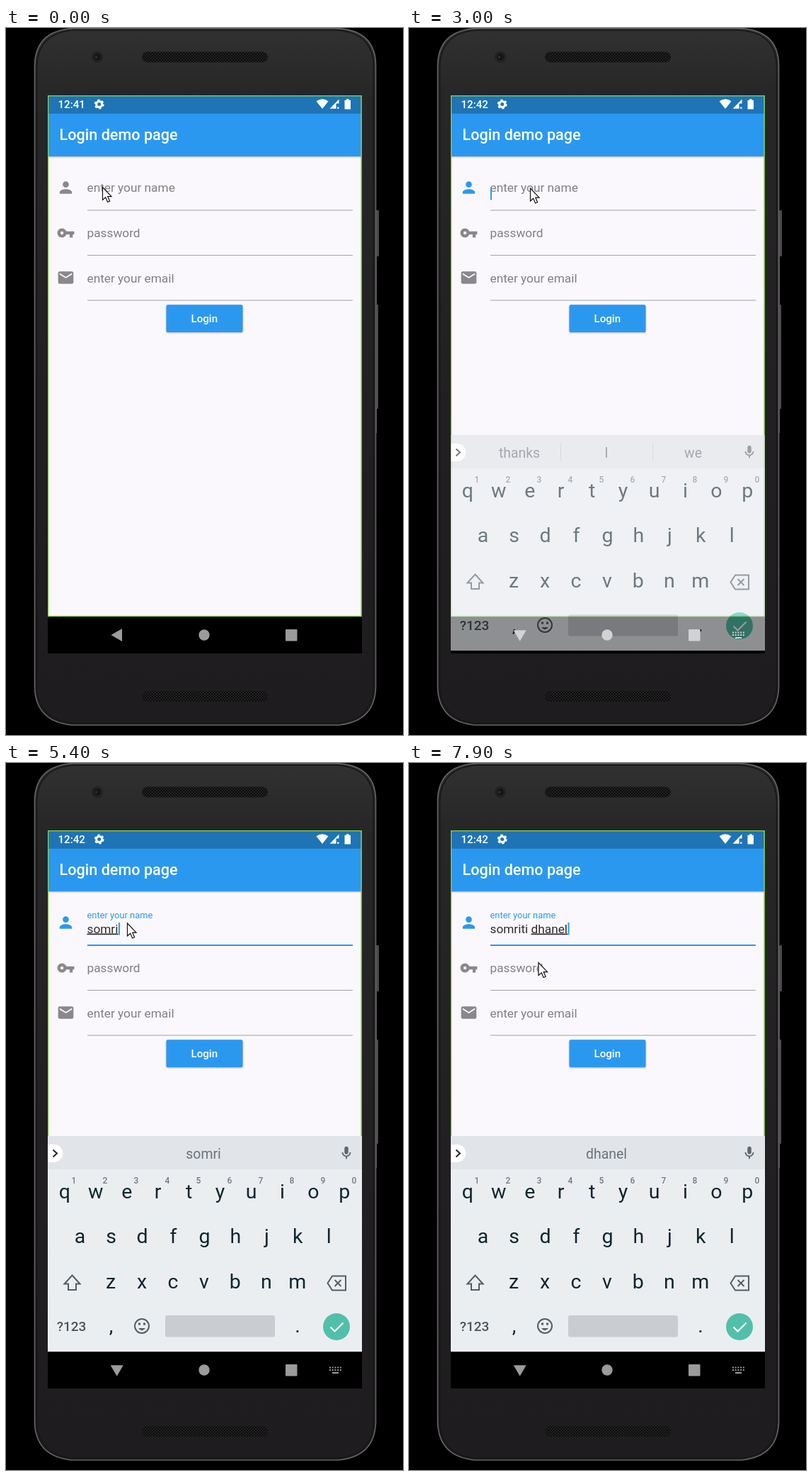
Write an HTML page that moves like this. It is 561 px wide and 997 px high and loops after 8000 ms.

```html
<!DOCTYPE html>
<html lang="en">
<head>
<meta charset="utf-8">
<title>Login demo</title>
<style>
html, body { margin: 0; width: 100%; height: 100%; overflow: hidden; background: #000; }
svg { display: block; width: 100%; height: 100%; font-family: Roboto, sans-serif; }
text { white-space: pre; }
.med { font-weight: 500; }
.mid { text-anchor: middle; }
.field { font-size: 17.25px; fill: #807f82; }
.key { font-size: 28.5px; fill: #0e2630; text-anchor: middle; }
.num { font-size: 12px; font-weight: 500; fill: #737b80; text-anchor: middle; }
.sug { font-size: 19.4px; fill: #6c7378; text-anchor: middle; }
.line { fill: none; stroke: #535d63; stroke-width: 2; }
.raised { filter: drop-shadow(0 1.5px 1.3px rgba(0, 0, 0, .3)); }
</style>
</head>
<body>
<svg viewBox="0 0 561 997">
  <defs>
    <linearGradient id="body" x1="0" y1="0" x2="0" y2="1">
      <stop offset="0" stop-color="#323132"/><stop offset=".09" stop-color="#282728"/>
      <stop offset=".5" stop-color="#222022"/><stop offset="1" stop-color="#1e1c1e"/>
    </linearGradient>
    <pattern id="mesh" width="4" height="4" patternUnits="userSpaceOnUse">
      <rect width="4" height="4" fill="#232223"/>
      <circle cx="1" cy="1" r="1.1" fill="#080808"/><circle cx="3" cy="3" r="1.1" fill="#080808"/>
    </pattern>
    <clipPath id="screen"><rect x="59" y="95" width="444" height="787"/></clipPath>
  </defs>

  <rect width="561" height="997"/>
  <g fill="#4b4a4b">
    <rect x="522" y="257" width="5" height="65" rx="1"/>
    <rect x="522" y="390" width="4" height="147" rx="1"/>
    <rect x="521" y="280" width="3" height="291"/>
  </g>
  <path d="M96 .5H467Q522 3 522.5 52V930Q521 978 470 983H93Q42 978 40.5 930V52Q42 3 96 .5Z" fill="url(#body)" stroke="#666566" stroke-width="1.6"/>
  <path d="M97 3H466Q519 6 519.5 54V929Q518 975 469 980.5H94Q45 975 43.5 929V54Q45 6 97 3Z" fill="none" stroke="#171617" stroke-width="1.6"/>
  <g fill="url(#mesh)">
    <rect x="192" y="33.5" width="178" height="15" rx="7.5"/>
    <rect x="192" y="935" width="178" height="15" rx="7.5"/>
  </g>
  <circle cx="129" cy="41" r="8" fill="#232223"/>
  <circle cx="129" cy="41" r="5" fill="#171617"/>
  <circle cx="127.5" cy="41" r="1.5" fill="#383739"/>

  <g clip-path="url(#screen)">
    <rect x="59" y="95" width="444" height="787"/>
    <rect x="59" y="95" width="443.5" height="735" fill="#faf8fc"/>
    <rect x="59" y="120" width="443.5" height="61" fill="#2b98f0" class="raised"/>
    <rect x="59" y="95" width="443.5" height="25.8" fill="#1e74b4"/>
    <rect x="59.6" y="95.6" width="442.4" height="733.9" fill="none" stroke="#86d04c" stroke-width="1.4"/>
    <g fill="#fff">
      <text id="clock" class="med" x="73.5" y="113" font-size="15.1"></text>
      <g fill="none" stroke="#fff">
        <circle cx="131.7" cy="107.5" r="4" stroke-width="3"/>
        <circle cx="131.7" cy="107.5" r="5.8" stroke-width="2.4" stroke-dasharray="3.04"/>
      </g>
      <path d="M438.5 103.3Q447 97.3 455.5 103.3L447 114Z"/>
      <path d="M457.5 113.7L470.5 100.5V106.5H466.5V113.7Z"/><rect x="468" y="111.7" width="2.5" height="2"/>
      <path d="M478.5 101.7H481V100.2H484.5V101.7H487V114.5H478.5Z"/>
      <text class="med" x="75.5" y="158.4" font-size="21.6">Login demo page</text>
    </g>

    <g id="icons" fill="#8a888b"></g>
    <path d="M115 257H490M115 320.5H490M115 384H490" stroke="#a2a1a4" stroke-width="1.2"/>
    <rect id="focus" y="256" height="2" fill="#2b98f0"/>
    <text id="label" class="field" x="114.5">enter your name</text>
    <text id="hint" class="field" x="114.5" y="239.5">Somriti Dhanel</text>
    <text id="typed" class="field" x="114.5" y="239.5" style="fill:#2d2c2e"><tspan></tspan><tspan text-decoration="underline"></tspan></text>
    <rect id="caret" y="225" width="2" height="17.5" fill="#2b98f0"/>
    <text class="field" x="114.5" y="295">password</text>
    <text class="field" x="114.5" y="358.5">enter your email</text>
    <rect x="226.5" y="390.3" width="108" height="38.8" rx="2.2" fill="#2b98f0" class="raised"/>
    <text class="med mid" x="280.3" y="415" font-size="15.1" fill="#fff">Login</text>

    <g id="board">
      <rect x="59" y="526" width="444" height="304" fill="#ebeef1"/>
      <rect x="59" y="526" width="444" height="47" fill="#e1e4e8"/>
      <path d="M59 538H68A12.5 12.5 0 0 1 68 563H59Z" fill="#fff"/>
      <path d="M66.5 545.5L72 550.5L66.5 555.5" class="line" style="stroke:#222"/>
      <path id="bars" d="M214.5 537V563M344.5 537V563" stroke="#c3c7cb"/>
      <g id="sugs"></g>
      <g id="keys"></g>
      <path d="M93.5 722.5L104.5 734.5H99V743H88V734.5H82.5Z" class="line"/>
      <path d="M461 723.5H480V743.5H461L454.5 733.5ZM464.5 729L473.5 738M473.5 729L464.5 738" class="line"/>
      <text class="med" x="71.7" y="801" font-size="19" fill="#4b555b">?123</text>
      <g class="line">
        <circle cx="192" cy="794" r="10"/>
        <path d="M187 797Q192 803.5 197 797Z" fill="#535d63" stroke="none"/>
        <path d="M187 791H190M194 791H197" stroke-width="3"/>
      </g>
      <rect x="225" y="779" width="155" height="30.5" rx="3" fill="#c9ccd0"/>
      <circle cx="467" cy="795" r="19" fill="#52bfab"/>
      <path d="M458.5 795.5L464.5 801.5L476.5 789.5" fill="none" stroke="#fff" stroke-width="2.2"/>
    </g>

    <g id="nav">
      <path id="back" d="M148.5 856L164 847V865Z"/>
      <circle cx="280" cy="856" r="7.7"/>
      <rect x="395" y="848" width="16.5" height="16.5" rx="1"/>
      <path id="swap" d="M457 852.5H474M457 856H474" fill="none" stroke-width="2" stroke-dasharray="2 1.7"/>
      <path id="swap2" d="M461 860H470" stroke-width="2"/>
    </g>
  </g>
  <path id="mouse" d="M.5 .5V18.5L4.7 14.7L7.6 21.5L10.6 20.2L7.7 13.6H13Z" fill="#fff" stroke="#111" stroke-width="1.2"/>
</svg>

<script>
const $ = id => document.getElementById(id);
const clamp = x => Math.max(0, Math.min(1, x));
const ease = x => { x = clamp(x); return x * x * (3 - 2 * x); };
const mix = (a, b, p) => a + (b - a) * p;
const set = (id, attrs) => { for (const k in attrs) $(id).setAttribute(k, attrs[k]); };
const icon = (x, y, size, d, more = "") =>
  `<path transform="translate(${x - size / 2} ${y - size / 2}) scale(${size / 24})" d="${d}" ${more}/>`;

const NAME = "somriti dhanel";
const TYPE_AT = 4700, STEP = 165;

$("icons").innerHTML =
  icon(84.5, 225, 26, "M12 12c2.21 0 4-1.79 4-4s-1.79-4-4-4-4 1.79-4 4 1.79 4 4 4zm0 2c-2.67 0-8 1.34-8 4v2h16v-2c0-2.66-5.33-4-8-4z", 'id="person"') +
  icon(84.5, 289, 26, "M12.65 10C11.83 7.67 9.61 6 7 6c-3.31 0-6 2.69-6 6s2.69 6 6 6c2.61 0 4.83-1.67 5.65-4H17v4h4v-4h2v-4zM7 14c-1.1 0-2-.9-2-2s.9-2 2-2 2 .9 2 2-.9 2-2 2z") +
  icon(84.5, 352, 26, "M20 4H4c-1.1 0-2 .9-2 2v12c0 1.1.9 2 2 2h16c1.1 0 2-.9 2-2V6c0-1.1-.9-2-2-2zm0 4l-8 5-8-5V6l8 5 8-5z");

const row = (letters, x, y) => [...letters].map((c, i) =>
  `<text class="key" x="${x + i * 43.95}" y="${y}">${c}</text>`).join("");
$("keys").innerHTML =
  row("qwertyuiop", 82.8, 613.6) + row("asdfghjkl", 104.6, 677) + row("zxcvbnm", 148, 740.6) +
  row(",", 148.5, 803) + row(".", 412, 803) +
  [..."1234567890"].map((c, i) => `<text class="num" x="${96 + i * 44}" y="593.3">${c}</text>`).join("") +
  icon(481, 550, 22, "M12 14c1.66 0 3-1.34 3-3V5c0-1.66-1.34-3-3-3S9 3.34 9 5v6c0 1.66 1.34 3 3 3zm5-3c0 2.76-2.24 5-5 5s-5-2.24-5-5H5c0 3.53 2.61 6.43 6 6.92V21h2v-3.08c3.39-.49 6-3.39 6-6.92z", 'fill="#5f686e"');
$("sugs").innerHTML = [156, 279, 401.5].map(x => `<text class="sug" x="${x}" y="557.5"></text>`).join("");

const typedAt = t => NAME.slice(0, t < TYPE_AT ? 0 : Math.floor((t - TYPE_AT) / STEP) + 1);

function suggest(word) {
  if (!word) return ["thanks", "I", "we"];
  if (word.length > 3) return ["", word, ""];
  const known = { s: ["so", "sorry"], so: ["some", "sorry"], som: ["some", "something"], dh: ["DH", "de"] };
  return [word, ...(known[word] || [word.toUpperCase(), "than"])];
}

function draw(t) {
  $("clock").textContent = t < 2500 ? "12:41" : "12:42";

  const a = ease((t - 700) / 500), b = ease((t - 7300) / 600);
  set("mouse", { transform: `translate(${mix(mix(136, 171, a), 182.5, b)} ${mix(mix(224, 225.5, a), 281, b)})` });

  // Field focus and floating label
  const focused = t >= 2900, p = ease((t - 3000) / 200);
  const text = typedAt(t), cut = text.lastIndexOf(" ") + 1;
  set("person", { fill: focused ? "#2b98f0" : "#8a888b" });
  set("focus", { x: mix(302.5, 115, p), width: 375 * p });
  set("label", { y: mix(231, 218.5, p) });
  $("label").style.fontSize = mix(17.25, 12.9, p) + "px";
  $("label").style.fill = p > 0 ? "#2b98f0" : "";
  set("hint", { opacity: text ? 0 : p });
  const [done, current] = $("typed").children;
  done.textContent = text.slice(0, cut);
  current.textContent = text.slice(cut);
  const lastKey = text ? TYPE_AT + (text.length - 1) * STEP : 2650;
  set("caret", {
    x: 115 + (text ? $("typed").getComputedTextLength() : 0),
    opacity: focused && (t - lastKey) % 1000 < 500 ? 1 : 0
  });

  // Keyboard slides up while fading in
  const k = clamp((t - 2850) / 250);
  set("board", { transform: `translate(0 ${120 * (1 - k)})`, opacity: k });
  const early = typedAt(t + 100), words = suggest(early.slice(early.lastIndexOf(" ") + 1));
  [...$("sugs").children].forEach((el, i) => {
    const strong = i === 1 && words[0] && early && !early.endsWith(" ");
    el.textContent = words[i];
    el.style.fontWeight = strong ? 700 : 400;
    el.style.fill = strong ? "#111" : "";
  });
  set("bars", { opacity: words[0] ? 1 : 0 });

  const tone = k > 0 && k < 1 ? "#d2d2d2" : "#9b9b9b";
  set("nav", { fill: tone });
  for (const id of ["swap", "swap2"]) set(id, { stroke: tone, opacity: focused ? 1 : 0 });
  set("back", { transform: `rotate(${-90 * clamp((t - 2800) / 150)} 157 856.3)` });
}

function loop(now) {
  draw(Math.floor(now % 8000 / 100) * 100);
  requestAnimationFrame(loop);
}
draw(0);
requestAnimationFrame(loop);
</script>
</body>
</html>
```
